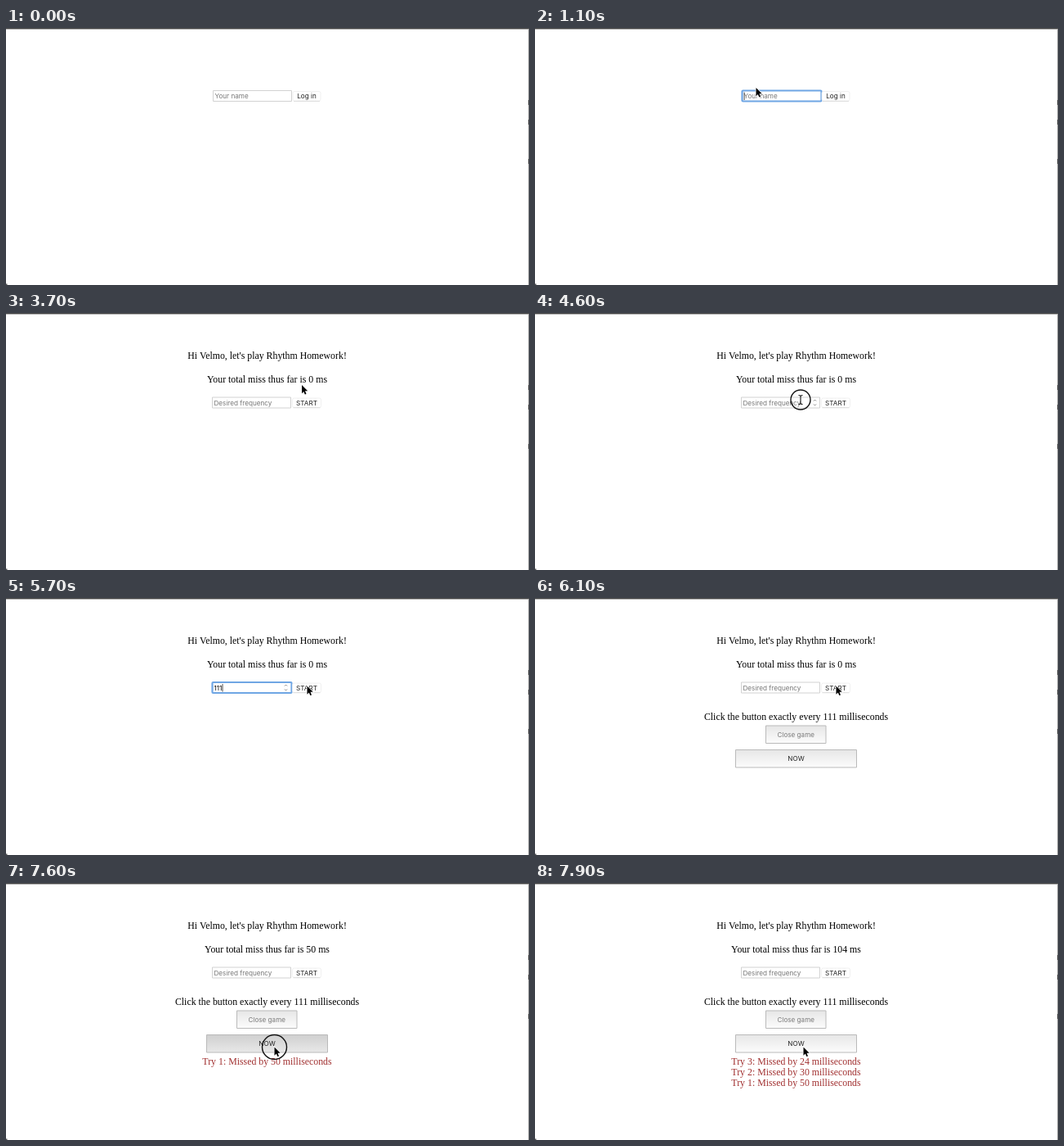
An HTML page with a canvas for the animation above (8000 ms loop, 640 by 314 pixels).

```html
<!DOCTYPE html>
<html lang="en">
<head>
<meta charset="utf-8">
<title>Rhythm game</title>
<style>
html, body { margin: 0; width: 100%; height: 100%; overflow: hidden; background: #fff; }
canvas { display: block; }
</style>
</head>
<body>
<canvas id="stage" width="640" height="314"></canvas>
<script>
const ctx = document.getElementById('stage').getContext('2d');
const LOOP = 8000, STEP = 100;
const SERIF = '11.84px "Liberation Serif", "Times New Roman", serif';
const SANS = '8.14px Inter, "Open Sans", sans-serif';
const NAME = 'Velmo', FREQUENCY = '111';
const MISSES = [50, 30, 24];

// Times at which typed characters and misses appear
const NAME_KEYS = [2000, 2200, 2300, 2400, 2400];
const FREQUENCY_KEYS = [5100, 5200, 5300];
const MISS_TIMES = [7600, 7700, 7800];

// Pointer stops: time, x, y
const PATH = [
  [300, 321, 318], [900, 270.5, 73],
  [2800, 270.5, 73], [2900, 304, 91], [3000, 328, 96.5], [3300, 362, 88],
  [3800, 362, 88], [4500, 325, 106],
  [5300, 325, 106], [5700, 368.5, 107.5],
  [6300, 368.5, 107.5], [7000, 328.5, 200.5]
];

// Click rings: start, end
const CLICKS = [[3300, 3500], [4500, 4700], [6000, 6100], [7200, 7400],
  [7600, 7700], [7700, 7800], [7800, 7900]];

const countPast = (times, t) => times.filter(time => time <= t).length;
const within = (t, from, to) => t >= from && t < to;

function pointerAt(t) {
  const next = PATH.findIndex(stop => stop[0] > t);
  if (next < 0) return PATH[PATH.length - 1].slice(1);
  if (next === 0) return PATH[0].slice(1);
  const [t0, x0, y0] = PATH[next - 1], [t1, x1, y1] = PATH[next];
  const p = (t - t0) / (t1 - t0), ease = p * p * (3 - 2 * p);
  return [x0 + (x1 - x0) * ease, y0 + (y1 - y0) * ease];
}

function text(string, x, y, font, color, align = 'center') {
  ctx.font = font;
  ctx.fillStyle = color;
  ctx.textAlign = align;
  ctx.fillText(string, x, y);
}

const line = (string, y, color = '#000') => text(string, 319.5, y, SERIF, color);

function box(x, y, w, h, fill, stroke, lineWidth = 1, radius = 0) {
  ctx.beginPath();
  ctx.roundRect(x, y, w, h, radius);
  ctx.fillStyle = fill;
  ctx.fill();
  ctx.strokeStyle = stroke;
  ctx.lineWidth = lineWidth;
  ctx.stroke();
}

function field(x, y, value, placeholder, focused, caret) {
  if (focused) box(x, y, 97, 13, '#fff', '#6fa6e4', 2.2, 1);
  else box(x, y, 96, 13, '#fff', '#d2d2d2');
  text(value || placeholder, x + 2, y + 9.7, SANS, value ? '#000' : '#777', 'left');
  if (caret) {
    ctx.fillStyle = '#222';
    ctx.fillRect(x + 2.2 + (value ? ctx.measureText(value).width : 0), y + 2, 0.8, 9.5);
  }
}

function spinner(x, y) {
  ctx.beginPath();
  for (const side of [-1, 1]) {
    ctx.moveTo(x - 1.5, y + side * 2);
    ctx.lineTo(x, y + side * 3.5);
    ctx.lineTo(x + 1.5, y + side * 2);
  }
  ctx.strokeStyle = '#777';
  ctx.lineWidth = 0.9;
  ctx.stroke();
}

function smallButton(label, x, y, w) {
  box(x, y, w, 11.5, '#fff', '#ececec', 0.8, 2);
  ctx.fillStyle = '#d4d4d4';
  ctx.fillRect(x + 1, y + 11.5, w - 2, 0.7);
  text(label, x + w / 2, y + 8.7, SANS, '#222');
}

function bigButton(label, x, y, w, color, pressed) {
  const shade = ctx.createLinearGradient(0, y, 0, y + 22);
  shade.addColorStop(0, pressed ? '#cfcfcf' : '#e6e6e6');
  shade.addColorStop(1, pressed ? '#e8e8e8' : '#fcfcfc');
  box(x + 0.5, y + 0.5, w, 21.5, shade, '#bababa');
  text(label, x + 0.5 + w / 2, y + 14.3, SANS, color);
}

function arrow(x, y) {
  ctx.save();
  ctx.translate(x, y);
  const shape = new Path2D('M0 0V10.2L2.3 8 3.8 11.6 5.5 10.9 4 7.3H7.2Z');
  ctx.strokeStyle = '#fff';
  ctx.lineWidth = 1.4;
  ctx.stroke(shape);
  ctx.fillStyle = '#000';
  ctx.fill(shape);
  ctx.restore();
}

function beam(x, y) {
  ctx.save();
  ctx.translate(x, y);
  ctx.strokeStyle = '#111';
  ctx.lineWidth = 1.1;
  ctx.stroke(new Path2D('M-2.5 -5.5Q0 -5.5 0 -4Q0 -5.5 2.5 -5.5M0 -4V4M-2.5 5.5Q0 5.5 0 4Q0 5.5 2.5 5.5'));
  ctx.restore();
}

function windowEdges() {
  ctx.fillStyle = '#454545';
  ctx.fillRect(0, 0, 640, 1.4);
  ctx.fillStyle = '#aaa';
  ctx.fillRect(639, 1, 1, 313);
  ctx.fillStyle = '#555';
  for (const y of [88, 112, 160]) ctx.fillRect(639, y, 1, 6);
  ctx.fillRect(0, 312.5, 1.5, 1.5);
}

function login(t) {
  const typed = NAME.slice(0, countPast(NAME_KEYS, t));
  field(253.5, 76.5, typed, 'Your name', t >= 1100, within(t, 1100, 1600));
  smallButton('Log in', 351, 77.5, 34);
}

function game(t, hovered) {
  const misses = MISSES.slice(0, countPast(MISS_TIMES, t));
  const total = misses.reduce((sum, miss) => sum + miss, 0);
  const started = t >= 6100;
  const focused = within(t, 4700, 6100);
  const typed = started ? '' : FREQUENCY.slice(0, countPast(FREQUENCY_KEYS, t));

  line(`Hi ${NAME}, let's play Rhythm Homework!`, 56.3);
  line(`Your total miss thus far is ${total} ms`, 84.5);
  field(252.5, 103, typed, 'Desired frequency', focused, focused);
  if (hovered || focused) spinner(342.5, 109.5);
  smallButton('START', 350.5, 104, 35);
  if (!started) return;

  line(`Click the button exactly every ${FREQUENCY} milliseconds`, 149);
  bigButton('Close game', 282, 155.5, 73.5, '#7a7a7a');
  const pressed = within(t, 7200, 7400) || within(t, 7600, 7900);
  bigButton('NOW', 245, 185, 148, '#222', pressed);
  misses.forEach((miss, i) =>
    line(`Try ${i + 1}: Missed by ${miss} milliseconds`, 221.7 + 13.3 * (misses.length - 1 - i), '#a13030'));
}

function pointer(t, x, y, overField) {
  const hidden = t < 400 || within(t, 2000, 2900) || within(t, 5100, 5400);
  if (hidden) return;
  (overField ? beam : arrow)(x, y);
  const click = CLICKS.find(([from, to]) => within(t, from, to));
  if (!click) return;
  ctx.beginPath();
  ctx.arc(x, y, 15 - (t - click[0]) * 0.03, 0, 2 * Math.PI);
  ctx.strokeStyle = '#111';
  ctx.lineWidth = 1.4;
  ctx.stroke();
}

function draw(now) {
  const t = Math.floor(now % LOOP / STEP) * STEP;
  const [x, y] = pointerAt(t);
  const overField = within(t, 3500, 6000) && x < 349 && y > 102;
  ctx.fillStyle = '#fff';
  ctx.fillRect(0, 0, 640, 314);
  windowEdges();
  if (t < 3500) login(t);
  else game(t, overField);
  pointer(t, x, y, overField);
}

const start = performance.now();
function tick() {
  draw(performance.now() - start);
  requestAnimationFrame(tick);
}
tick();
</script>
</body>
</html>
```
